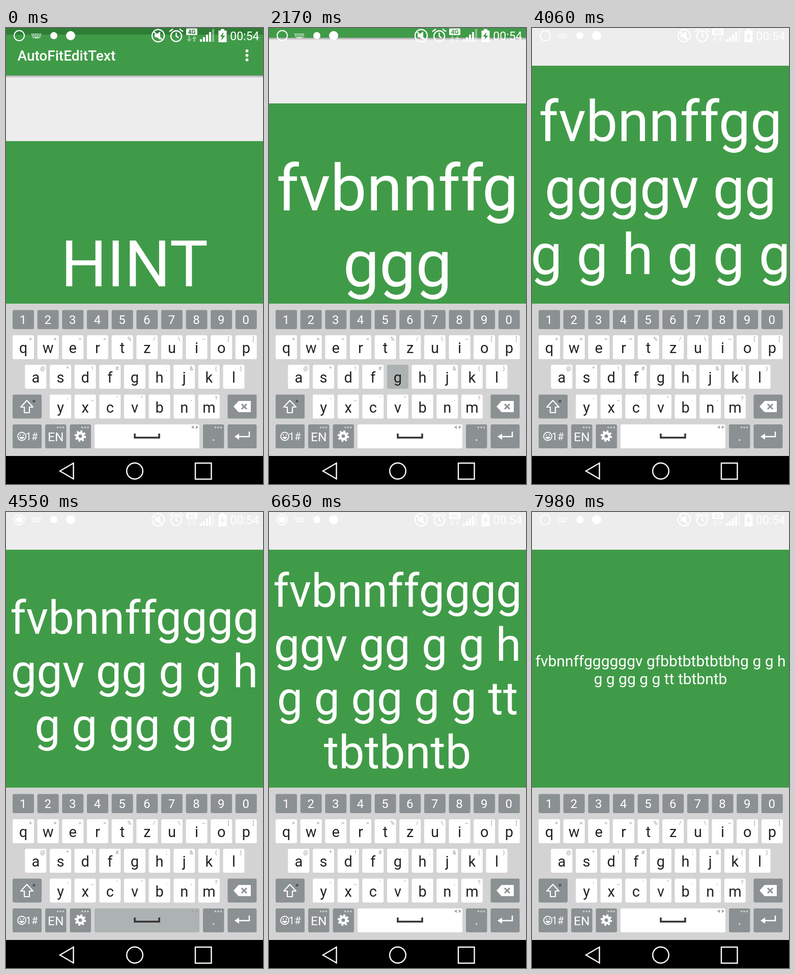
An HTML page that plays this animation: 505x895 px, repeating every 8 s.

```html
<!DOCTYPE html>
<html lang="en">
<head>
<meta charset="utf-8">
<title>AutoFitEditText</title>
<style>
html, body { margin: 0; width: 100%; height: 100%; overflow: hidden; background: #ededed; }
svg { display: block; width: 505px; height: 895px; }
text { font-family: Roboto, "Noto Sans", sans-serif; }
</style>
</head>
<body>
<svg id="stage" viewBox="0 0 505 895">
  <defs>
    <linearGradient id="shade" x2="0" y2="1">
      <stop offset="0" stop-color="#000" stop-opacity=".32"/>
      <stop offset="1" stop-color="#000" stop-opacity="0"/>
    </linearGradient>
    <mask id="net">
      <rect x="354" y="1" width="22" height="13" rx="2" fill="#fff"/>
      <text x="365" y="12" font-size="12" font-weight="700" text-anchor="middle">4G</text>
    </mask>
  </defs>
  <rect width="505" height="895" fill="#ededed"/>

  <g id="page">
    <rect width="505" height="93" fill="#409b48"/>
    <rect width="505" height="13" fill="#2e7e36"/>
    <rect y="93" width="505" height="5" fill="url(#shade)"/>
    <text x="22.4" y="63.5" font-size="28" font-weight="500" fill="#fff">AutoFitEditText</text>
    <g fill="#fff"><circle cx="473.5" cy="45" r="2.9"/><circle cx="473.5" cy="53.7" r="2.9"/><circle cx="473.5" cy="62.4" r="2.9"/></g>
    <rect y="222" width="505" height="467" fill="#409b48"/>
    <g id="lines" fill="#fff" text-anchor="middle"></g>
  </g>

  <g id="status" fill="#fff">
    <circle cx="26" cy="15" r="10" fill="none" stroke="#fff" stroke-width="2"/>
    <circle id="dot" cx="26" cy="15" r="6.5"/>
    <g stroke="#fff" stroke-width="2" stroke-dasharray="2 1.3"><path d="M50 12H70M51 15.5H69"/><path d="M53 19H67" stroke-dasharray="2 1.3 8 1.3"/></g>
    <circle cx="94" cy="15" r="7"/>
    <circle cx="127" cy="15" r="9"/>
    <g fill="none" stroke="#fff" stroke-width="2.4">
      <circle cx="299" cy="15" r="12"/><path d="M290 7L308 24"/>
      <circle cx="334.500" cy="16" r="10.500"/><path d="M334.500 9V16L339 19M321 7L328 2M341 2L348 7"/>
    </g>
    <path d="M292 12h4l7-5v16l-7-5h-4z"/>
    <rect x="354" y="1" width="22" height="13" mask="url(#net)"/>
    <g opacity=".45"><path d="M360 27l-5-5h3.500v-6h3v6h3.500zM370 16l5 5h-3.500v6h-3v-6h-3.500z"/></g>
    <path d="M381 22h4v5h-4zM387 18h4v9h-4zM393 13h4v14h-4zM399 8h4v19h-4z"/>
    <path d="M405 2h4v25h-4z" opacity=".4"/>
    <path fill-rule="evenodd" d="M422 2h7v3h4.500v23h-16V5h4.500zM427.500 8l-7 9h4l-2 8 8-10h-4.500z"/>
    <text x="497.500" y="24" font-size="23" text-anchor="end">00:54</text>
  </g>

  <rect y="541" width="505" height="299" fill="#d3d3d3"/>
  <g id="keys" text-anchor="middle"></g>

  <g fill="none" stroke="#fff" stroke-width="2.2" stroke-linejoin="round">
    <path d="M41 731L53 744H46V755H36V744H29Z"/>
    <circle cx="31" cy="801.500" r="8" stroke-width="1.8"/>
    <path d="M26.500 803a4.800 4.800 0 0 0 9 0z" fill="#fff" stroke-width="1"/>
    <circle cx="146" cy="801" r="6" stroke-width="5"/>
    <circle cx="146" cy="801" r="9.500" stroke-width="3.500" stroke-dasharray="3.730"/>
    <path d="M478 792V802H456" stroke-width="2.500" stroke-linejoin="miter"/>
  </g>
  <g fill="#fff">
    <circle cx="28" cy="799" r="1.200"/><circle cx="34" cy="799" r="1.200"/>
    <path d="M449 802l9-6v12z"/>
    <path d="M447 743l10-11h24v22h-24z"/>
    <text x="50.500" y="809" font-size="20" text-anchor="middle">1#</text>
    <text x="97.700" y="811" font-size="24.500" text-anchor="middle">EN</text>
    <text x="408" y="810" font-size="24" text-anchor="middle">.</text>
  </g>
  <path d="M463 738l10 10M473 738l-10 10" stroke="#8b9192" stroke-width="3"/>
  <circle cx="55" cy="732.500" r="2.700" fill="#555b5c"/>
  <path d="M253 796V804H301V796" fill="none" stroke="#333" stroke-width="3.500"/>
  <path d="M369 780v7l-5-3.500zM373 780v7l5-3.500z" fill="#a5a5a5"/>
  <g stroke="#d0d3d3" stroke-width="3.600" stroke-linecap="round" stroke-dasharray="0 5.500"><path d="M101.500 784H114M150 784H162.500M411.500 784H424"/></g>

  <rect y="840" width="505" height="55"/>
  <g fill="none" stroke="#fff" stroke-width="2.400">
    <path d="M106 869.500L132.500 854V885Z"/><circle cx="253" cy="869.500" r="15.800"/><rect x="372" y="854" width="31.500" height="31.500"/>
  </g>
</svg>
<script>
const NS = "http://www.w3.org/2000/svg";
const $ = id => document.getElementById(id);
const STEP = 70, LOOP = 8000, GREY = "#8b9192", HELD = "#adb3b2";

function add(parent, tag, attrs, text) {
  const el = document.createElementNS(NS, tag);
  for (const k in attrs) el.setAttribute(k, attrs[k]);
  if (text) el.textContent = text;
  return parent.appendChild(el);
}

// Keyboard
const caps = {};
function key(x, y, w, h, fill) {
  return add($("keys"), "rect", { x, y, width: w, height: h, rx: 3, fill });
}
function row(x0, y, letters, hints) {
  [...letters].forEach((c, i) => {
    const x = x0 + i * 48.65;
    caps[c] = key(x, y, 42, 47, "#fff");
    add($("keys"), "text", { x: x + 21, y: y + 35, "font-size": 29, fill: "#222" }, c);
    add($("keys"), "text", { x: x + 35, y: y + 11, "font-size": 11, fill: "#999" }, hints[i]);
  });
}
[..."1234567890"].forEach((c, i) => {
  const x = 13 + i * 48.65;
  key(x, 553.5, 42, 37.5, GREY);
  add($("keys"), "text", { x: x + 20.5, y: 581, "font-size": 24, fill: "#fff" }, c);
});
row(13, 603, "qwertzuiop", "+×÷=%/\\~[]");
row(37.3, 661, "asdfghjkl", "@*!#:;&()");
row(86, 719.5, "yxcvbnm", "-_'\".,?");
for (const [x, y, w] of [[13, 719.5, 57], [435.5, 719.5, 57], [13, 778, 57], [77, 778, 41.5],
  [125.5, 778, 41.5], [387, 778, 41.5], [435.5, 778, 57]]) key(x, y, w, 47, GREY);
caps._ = key(174, 778, 206, 47, "#fff");

// Keystrokes: release time and key; capitals and "_" show the key held just before
const parse = log => log.split(" ").map(s => {
  const c = s.slice(-1);
  return { t: parseInt(s), cap: c.toLowerCase(), held: c === "_" || c !== c.toLowerCase(),
    ch: /[_.]/.test(c) ? " " : c.toLowerCase() };
});
const typed = parse("490f 630v 840B 980N 1120N 1330F 1470F 1610g 1750g 1960G 2100G 2240G 2450G 2590V " +
  "2870. 2870g 3010G 3080_ 3150g 3220_ 3290g 3500_ 3570h 3640_ 3710g 3780_ 3850g 4060_ 4060g " +
  "4130g 4200_ 4340g 4410_ 4550G 4620_ 4760T 4830t 4900_ 4970t 5110B 5250t 5390B 5460n 5530t 5600b");
const inserted = parse("6720f 6790b 6860b 6930t 7000b 7070t 7140b 7210t 7280b 7350t 7420b 7910H");
const CARET = 16;

// Start time, font size, then line breaks (counted without the inserted part)
const layouts = [
  [0, 127, 8, 14], [3710, 111, 9, 17], [4130, 103, 10, 19], [4340, 90, 11, 23, 37],
  [6720, 90, 11, 21, 34], [6860, 90, 11, 19, 32], [7000, 87, 11, 17, 30], [7140, 84, 12, 17, 30],
  [7280, 77, 13, 17, 32], [7420, 70, 14, 19, 37], [7910, 30, 23]
];
const blinks = [[350, 910], [1750, 2030], [2730, 3500], [4480, 5320], [6300, 7000]];

const textAt = (keys, t) => keys.filter(k => k.t <= t).map(k => k.ch).join("");

function linesAt(t) {
  const base = textAt(typed, t), extra = textAt(inserted, t);
  const [, size, ...breaks] = layouts.filter(l => l[0] <= t).pop();
  if (!base) return { size, lines: ["HINT"] };
  const full = base.slice(0, CARET) + extra + base.slice(CARET);
  const cuts = [0, ...breaks.map(b => b > CARET ? b + extra.length : b), full.length];
  const lines = cuts.slice(1).map((end, i) => full.slice(cuts[i], end).trim()).filter(Boolean);
  return { size, lines };
}

function slide(t, start) {
  const u = Math.min(1, Math.max(0, (t - start) / 280));
  return 1 - (1 - u) ** 2;
}

const rows = Array.from({ length: 4 }, () => add($("lines"), "text", { x: 252.5 }));

function draw(now) {
  const t = Math.floor(now % LOOP / STEP) * STEP;
  const pan = 74 * (slide(t, 1750) + slide(t, 2870));
  $("page").setAttribute("transform", `translate(0 ${-pan})`);

  const { size, lines } = linesAt(t);
  rows.forEach((el, i) => {
    el.textContent = lines[i] || "";
    el.setAttribute("font-size", size);
    el.setAttribute("y", 457 + size * (.392 + (i - (lines.length - 1) / 2) * 1.172));
  });

  for (const c in caps) caps[c].setAttribute("fill", "#fff");
  for (const k of [...typed, ...inserted])
    if (k.held && t >= k.t - STEP && t < k.t) caps[k.cap].setAttribute("fill", HELD);

  $("dot").setAttribute("visibility", blinks.some(([a, b]) => t >= a && t < b) ? "visible" : "hidden");
}

function tick() {
  draw(performance.now());
  requestAnimationFrame(tick);
}
tick();
</script>
</body>
</html>
```
